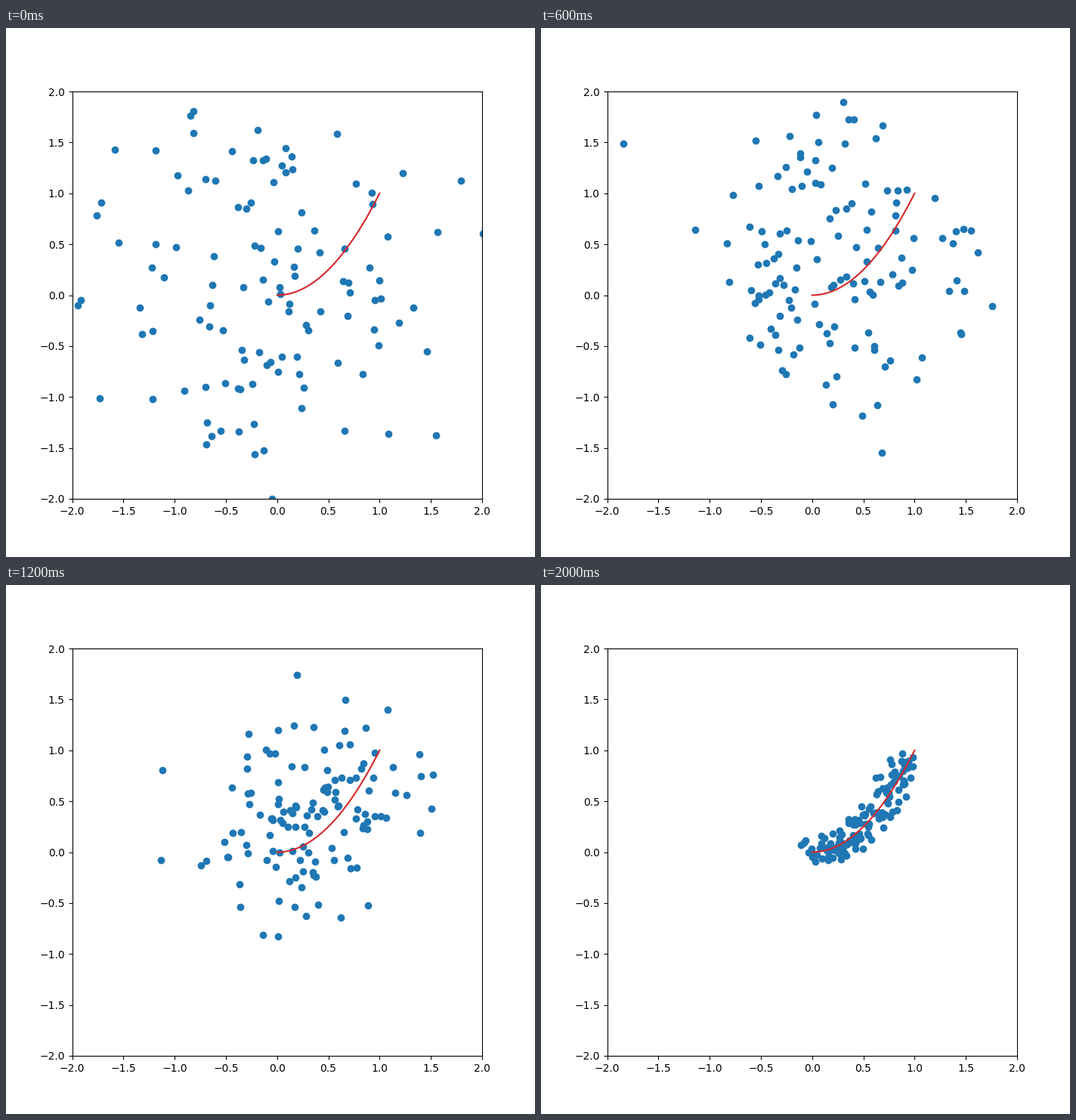
These frames come from a looping animation (700x700 px, 2.2 s). A matplotlib script:

```python
import numpy as np
import matplotlib.pyplot as plt
from matplotlib.animation import FuncAnimation

COUNT = 128
FRAMES = 11
INTERVAL = 200
LIMIT = 2.0


def parabola(x):
    return np.column_stack([x, x ** 2])


def diffuse(rng):
    """Add noise to the parabola step by step; return the steps reversed."""
    pts = parabola(rng.uniform(0, 1, COUNT))
    steps, last = [], 1.0
    for sigma in np.linspace(0.085, 0.97, FRAMES):
        signal = 1 - sigma ** 2
        keep = signal / last
        noise = rng.standard_normal(pts.shape)
        pts = np.sqrt(keep) * pts + np.sqrt(1 - keep) * noise
        steps.append(pts)
        last = signal
    return steps[::-1]


clouds = diffuse(np.random.default_rng(7))

fig, ax = plt.subplots(figsize=(7, 7), dpi=100)
ax.set_xlim(-LIMIT, LIMIT)
ax.set_ylim(-LIMIT, LIMIT)
dots = ax.scatter(*clouds[0].T, color="tab:blue")
ax.plot(*parabola(np.linspace(0, 1, 100)).T, color="tab:red")


def update(frame):
    dots.set_offsets(clouds[frame])
    return (dots,)


anim = FuncAnimation(fig, update, frames=FRAMES, interval=INTERVAL,
                     repeat=True, repeat_delay=0)
plt.show()
```
